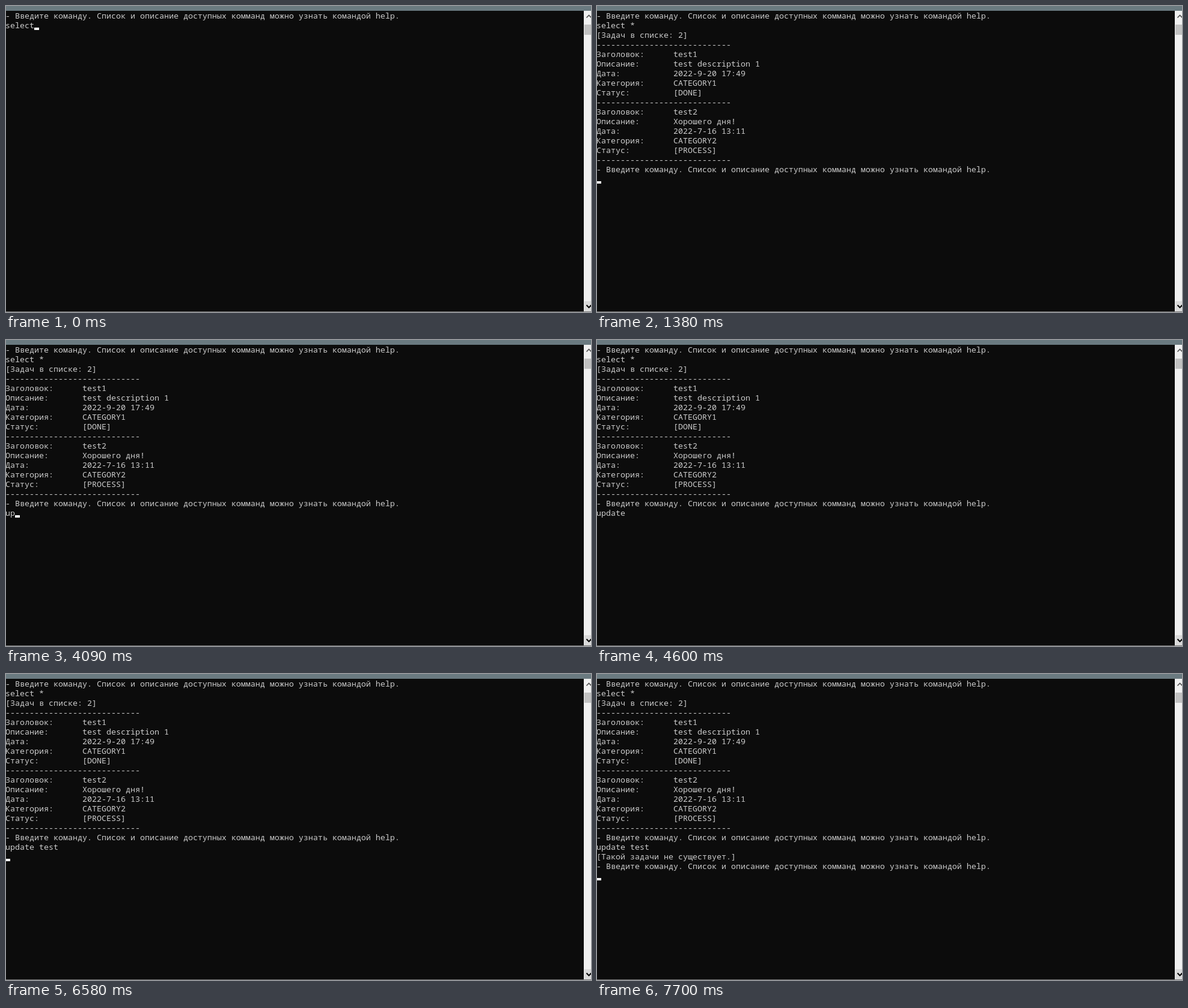
An HTML page for the animation above (8 s loop, 973x510 px).

```html
<!DOCTYPE html>
<html lang="ru">
<head>
<meta charset="utf-8">
<title>Console</title>
<style>
  html, body { margin: 0; width: 100%; height: 100%; overflow: hidden; background: #0c0c0c; }
  svg { display: block; }
  text {
    font: 13.3333px "Noto Sans Mono", "DejaVu Sans Mono", monospace;
    font-variant-ligatures: none;
    white-space: pre;
    fill: #ccc;
  }
</style>
</head>
<body>
<svg width="973" height="510" viewBox="0 0 973 510">
  <rect width="973" height="510" fill="#0c0c0c"/>
  <g id="lines"></g>
  <rect id="cursor" width="8" height="4" fill="#fff"/>
  <rect width="973" height="8" fill="#6a7a80"/>
  <g id="scrollbar">
    <rect x="961" y="8" width="12" height="501" fill="#f0f0f0"/>
    <rect x="962" y="31" width="11" height="17" fill="#c1c1c1"/>
    <rect x="962" y="492" width="11" height="17" fill="#dadada"/>
    <path d="M965.5 19.5l4-4 4 4" fill="none" stroke="#505050" stroke-width="1.6"/>
    <path d="M965.5 498.5l4 4 4-4" fill="none" stroke="#000" stroke-width="2"/>
  </g>
  <rect y="509" width="973" height="1" fill="#767676"/>
</svg>
<script>
const LOOP = 8000, CELL = 8, ROW = 16, LEFT = -1, TOP = 8, BASELINE = 13;

const prompt = "- Введите команду. Список и описание доступных комманд можно узнать командой help.";
const rule = "-".repeat(28);
const labels = ["Заголовок:", "Описание:", "Дата:", "Категория:", "Статус:"];
const task = (...values) => values.map((v, i) => labels[i].padEnd(16) + v);

const listing = [
  "[Задач в списке: 2]",
  rule,
  ...task("test1", "test description 1", "2022-9-20 17:49", "CATEGORY1", "[DONE]"),
  rule,
  ...task("test2", "Хорошего дня!", "2022-7-16 13:11", "CATEGORY2", "[PROCESS]"),
  rule,
  prompt
];

const start = [prompt];
const entered = [...start, "select *"];
const listed = [...entered, ...listing];
const updated = [...listed, "update test"];
const answered = [...updated, "[Такой задачи не существует.]", prompt];

// [time, finished lines, typed text, cursor shown]
const steps = [
  [0, start, "select", true],
  [400, start, "select", false],
  [490, start, "select ", true],
  [920, start, "select *", true],
  [1350, entered, "", true],
  [1380, listed, "", true],
  [1990, listed, "", false],
  [2510, listed, "", true],
  [2850, listed, "u", true],
  [3030, listed, "u", false],
  [3510, listed, "up", true],
  [3540, listed, "up", false],
  [4090, listed, "up", true],
  [4180, listed, "upd", true],
  [4270, listed, "upda", true],
  [4480, listed, "updat", true],
  [4600, listed, "update", false],
  [5120, listed, "update", true],
  [5150, listed, "update ", true],
  [5550, listed, "update t", true],
  [5640, listed, "update t", false],
  [5670, listed, "update te", true],
  [5910, listed, "update tes", true],
  [6030, listed, "update test", true],
  [6150, listed, "update test", false],
  [6580, updated, "", true],
  [6610, answered, "", true],
  [7210, answered, "", false],
  [7700, answered, "", true]
];

const cursor = document.getElementById("cursor");
const rows = Array.from({ length: answered.length + 1 }, (_, i) => {
  const row = document.createElementNS("http://www.w3.org/2000/svg", "text");
  row.setAttribute("x", LEFT);
  row.setAttribute("y", TOP + i * ROW + BASELINE);
  document.getElementById("lines").append(row);
  return row;
});

let current;

function show(step) {
  if (step === current) return;
  current = step;
  const [, done, typed, blink] = step;
  const screen = [...done, typed];
  rows.forEach((row, i) => { row.textContent = screen[i] || ""; });
  cursor.setAttribute("x", LEFT + typed.length * CELL);
  cursor.setAttribute("y", TOP + screen.length * ROW - 4);
  cursor.setAttribute("visibility", blink ? "visible" : "hidden");
}

const begin = performance.now();

function tick() {
  const time = (performance.now() - begin) % LOOP;
  show(steps.findLast(([at]) => at <= time));
  requestAnimationFrame(tick);
}
tick();
</script>
</body>
</html>
```
